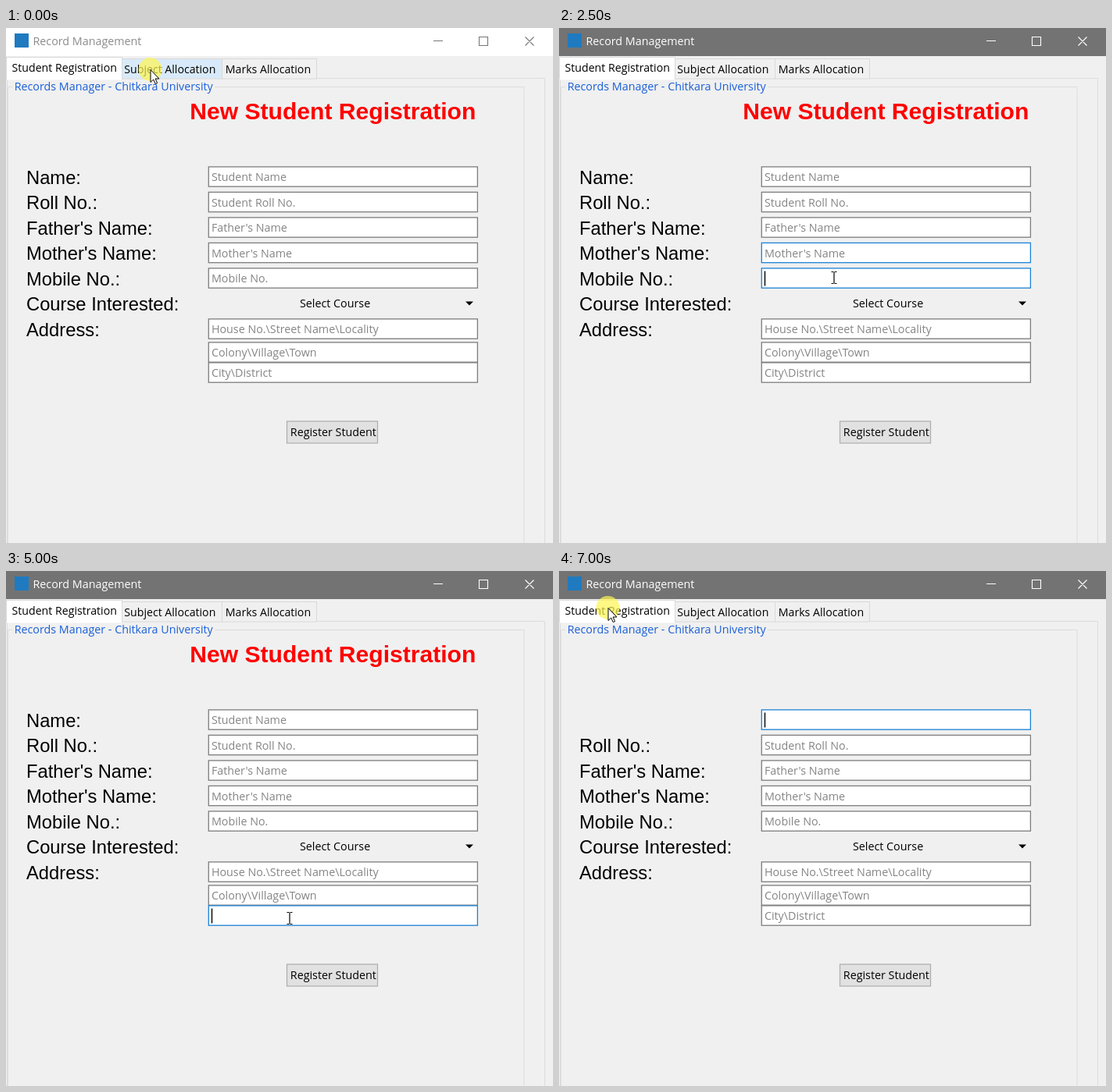
Animation of 700x660 px, one loop 7.5 s. Source, as an HTML page:

```html
<!DOCTYPE html>
<html lang="en">
<head>
<meta charset="utf-8">
<title>Record Management</title>
<style>
html, body { margin: 0; width: 100%; height: 100%; overflow: hidden; background: #f0f0f0; }
svg { display: block; }
text { font: 14.3px "Open Sans", "Noto Sans", sans-serif; white-space: pre; }
.tab { font-size: 14.15px; }
.label { font: 23.75px "Liberation Sans", Arial, sans-serif; }
.heading { font: bold 30.1px "Liberation Sans", Arial, sans-serif; }
.popup { filter: drop-shadow(3px 3px 1px #0009); }
.glow { fill: #fff550; opacity: .7; }
</style>
</head>
<body>
<svg id="stage" width="700" height="660" viewBox="0 0 700 660"></svg>
<script>
const STEP = 500, LOOP = 7500;

// Tabs: label, text x, left edge, right edge
const tabs = [
  ['Student Registration', 7.6, 2, 146],
  ['Subject Allocation', 151.3, 146, 276],
  ['Marks Allocation', 280.8, 276, 397]
];

// Rows: label, hint, optional centre y; a row without a hint holds the menu
const pages = [
  {
    heading: 'New Student Registration', headX: 235.2, fieldX: 259.3, right: 663,
    rows: [
      ['Name:', 'Student Name'],
      ['Roll No.:', 'Student Roll No.'],
      ["Father's Name:", "Father's Name"],
      ["Mother's Name:", "Mother's Name"],
      ['Mobile No.:', 'Mobile No.'],
      ['Course Interested:', ''],
      ['Address:', 'House No.\\Street Name\\Locality'],
      ['', 'Colony\\Village\\Town', 415.5],
      ['', 'City\\District', 441.5]
    ],
    button: ['Register Student', 359, 518, 117],
    menu: {
      text: 'Select Course', x: 376, y: 353, arrow: 593, left: 259.5, width: 345,
      items: ['Computer Science Engineering', 'Electronics and Communcation Engineering',
        'Mechanical Engineering', 'Civil Engineering', 'Electrical Engineering', 'Mechatronics']
    }
  },
  {
    heading: 'Subject Allocation', headX: 193, fieldX: 190.4, right: 688.5,
    rows: [
      ['Roll No.:', 'Roll No.'],
      ['Subject Id:', 'Subject ID'],
      ['Subject Name:', 'Subject Name'],
      ['Credits:', 'No. of Credits']
    ],
    button: ['Allocate Subject', 266, 368, 116]
  },
  {
    heading: 'Marks Allocation', headX: 208.7, fieldX: 206.5, right: 688.5,
    rows: [
      ['Roll No.:', 'Roll No.'],
      ['Subject Id:', 'Subject ID'],
      ['Subject Name:', 'Subject Name'],
      ['Test Type:', ''],
      ['Max Marks:', 'Max Marks'],
      ['Obtained Marks:', 'Obtained Marks']
    ],
    button: ['Assign Marks', 280, 433, 97],
    menu: {
      text: 'Select Test Type', x: 216, y: 288, arrow: 340.5, left: 206.5, width: 143,
      items: ['FA', 'ST', 'End Term', 'Project Based']
    }
  }
];

// focus: row with the caret; fade: row whose border is still blue
const steps = [
  { page: 0, arrow: [184.5, 53], hover: 1, inactive: true },
  { page: 1, arrow: [308, 55.5], hover: 2, focus: 0 },
  { page: 0, beam: [351, 212], focus: 1 },
  { page: 0, beam: [351, 260], focus: 2 },
  { page: 0, beam: [352, 303], focus: 3 },
  { page: 0, beam: [352, 320], focus: 4, fade: 3 },
  { page: 0, arrow: [350, 349], focus: 4 },
  { page: 0, arrow: [345, 541], focus: 4, open: true },
  { page: 0, beam: [357, 391], focus: 6, fade: 4 },
  { page: 0, beam: [360, 427], focus: 7 },
  { page: 0, beam: [363, 445], focus: 8 },
  { page: 2, arrow: [330, 44], blank: true },
  { page: 2, arrow: [300, 277], focus: 0 },
  { page: 2, arrow: [255.5, 418], focus: 0, open: true },
  { page: 0, arrow: [62.5, 47], focus: 0, partial: true }
];

const text = (s, x, y, fill = '#000', cls = '') =>
  `<text x="${x}" y="${y}" fill="${fill}" class="${cls}">${s}</text>`;
const rect = (x, y, w, h, fill, stroke = 'none', line = 1) =>
  `<rect x="${x}" y="${y}" width="${w}" height="${h}" fill="${fill}" stroke="${stroke}" stroke-width="${line}"/>`;
const path = (d, stroke, line = 1, fill = 'none') =>
  `<path d="${d}" stroke="${stroke}" stroke-width="${line}" fill="${fill}"/>`;

function titleBar(inactive) {
  const ink = inactive ? '#777' : '#fff';
  return rect(0, 0, 700, 36, inactive ? '#fff' : '#737373') +
    rect(11, 7, 18, 18, '#1f7ac0') +
    text('Record Management', 34.5, 22, inactive ? '#8c8c8c' : '#fff') +
    path('M547 16.5h12M605.5 11.5h11v11h-11zM664.5 11.5l11 11m0-11l-11 11', ink, 1.1);
}

function tab(i, selected, hover) {
  const [label, x, left, right] = tabs[i];
  const grow = selected ? 2 : 0;
  const fill = selected ? '#fff' : hover ? '#d8eaf9' : '#f0f0f0';
  return rect(left - grow + .5, 39.5 - grow, right - left + 2 * grow, 25.5 + grow, fill, '#d9d9d9') +
    (selected ? rect(left - 1, 64, right - left + 3, 2.5, '#fff') : '') +
    text(label, x, 58 - grow, '#000', 'tab');
}

function notebook(s) {
  const order = [0, 1, 2].filter(i => i !== s.page).concat(s.page);
  return path('M1.5 660V64.5H689.5V660', '#dcdcdc') +
    order.map(i => tab(i, i === s.page, i === s.hover)).join('');
}

function field(x, y, hint, focused, blue) {
  return rect(x, y - 12.6, 344.1, 25.3, '#fff', blue ? '#1c82d6' : '#7d7d7d', 1.3) +
    (focused ? rect(x + 3.5, y - 9, 1.4, 19, '#000') : text(hint, x + 3.6, y + 5.5, '#858585'));
}

function form(s) {
  const p = pages[s.page];
  const [name, bx, by, bw] = p.button;
  let out = path(`M8 75.5H2.5V660M267 75.5H${p.right}V660`, '#dcdcdc') +
    text('Records Manager - Chitkara University', 10.7, 79.6, '#1a5fd8');
  if (!s.partial) out += text(p.heading, p.headX, 117, '#f00', 'heading');
  p.rows.forEach(([label, hint, at], i) => {
    const y = at || 190.5 + 32.5 * i;
    if (!(s.partial && i === 0)) out += text(label, 26, y + 9.3, '#000', 'label');
    if (hint) out += field(p.fieldX, y, hint, s.focus === i, s.focus === i || s.fade === i);
  });
  out += rect(bx + .5, by - 14, bw - 1, 28, '#e1e1e1', '#adadad', 1.2) + text(name, bx + 4.8, by + 5.3);
  if (p.menu) out += menu(p.menu, s.open);
  return out;
}

function menu(m, open) {
  let out = text(m.text, m.x, m.y + 5.3) + path(`M${m.arrow - 5} ${m.y - 2.5}h10l-5 5z`, 'none', 0, '#000');
  if (open) {
    out += `<g class="popup">${rect(m.left, m.y + 14.5, m.width, m.items.length * 23.8 + 6.5, '#f1f1f1', '#a0a0a0')}</g>`;
    m.items.forEach((item, i) => out += text(item, m.left + 29.4, m.y + 35.3 + 23.75 * i));
  }
  return out;
}

function pointer({ arrow, beam }) {
  if (beam) {
    const [x, y] = beam;
    return path(`M${x - 3.5} ${y - 7.5}h3m1 0h3M${x - 3.5} ${y + 7.5}h3m1 0h3M${x} ${y - 7}v14`, '#000', 1.2);
  }
  const [x, y] = arrow;
  return `<circle class="glow" cx="${x}" cy="${y}" r="15"/>` +
    path(`M${x + .5} ${y + .5}v16l3.7-3.5 2.5 5.6 2.4-1-2.5-5.6h4.9z`, '#000', 1, '#fff');
}

const stage = document.getElementById('stage');
let shown = -1;

function draw() {
  const i = Math.floor(performance.now() % LOOP / STEP);
  if (i !== shown) {
    const s = steps[shown = i];
    stage.innerHTML = rect(0, 0, 700, 660, '#f0f0f0') + titleBar(s.inactive) +
      notebook(s) + (s.blank ? '' : form(s)) + pointer(s);
  }
  requestAnimationFrame(draw);
}
draw();
</script>
</body>
</html>
```
